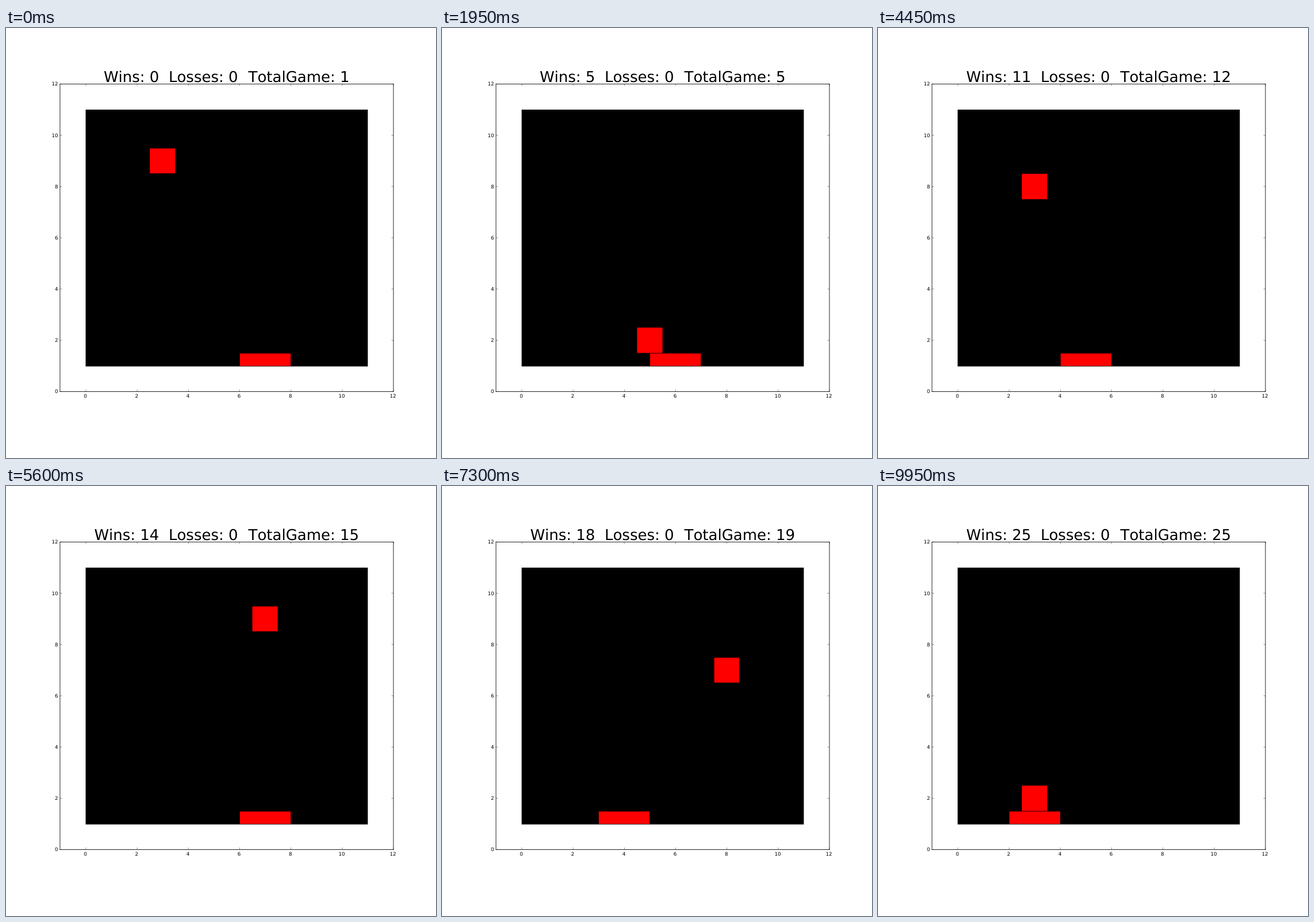
Write an HTML page that moves like this. It is 748 px wide and 748 px high and loops after 10000 ms.

```html
<!DOCTYPE html>
<html lang="en">
<head>
<meta charset="utf-8">
<title>Catch game</title>
<style>
  html, body { margin: 0; width: 100%; height: 100%; overflow: hidden; background: #fff; }
  svg { display: block; width: 748px; height: 748px; }
  text { font-family: "DejaVu Sans", sans-serif; font-size: 10px; font-kerning: none;
         text-rendering: geometricPrecision; white-space: pre; }
  .title { font-size: 30px; }
</style>
</head>
<body>
<svg id="stage" viewBox="0 0 864 864"></svg>
<script>
// The plot is laid out on an 864-unit grid and scaled down to the stage.
const STEP = 50, DROPS = 8, UNIT = 669.6 / 13, DIGIT = 19.1;

// One round per row: ball column, paddle start, paddle end
const rounds = [
  [3, 7, 3], [10, 6, 9], [6, 5, 6], [8, 5, 8], [5, 8, 6],
  [7, 4, 7], [2, 5, 2], [10, 6, 9], [5, 6, 5], [6, 5, 6],
  [4, 6, 4], [3, 6, 3], [7, 5, 7], [5, 7, 5], [7, 7, 7],
  [2, 6, 3], [6, 4, 6], [4, 6, 4], [8, 2, 8], [6, 5, 6],
  [5, 7, 5], [9, 4, 9], [6, 6, 6], [5, 7, 5], [3, 2, 3]
];

const svg = document.getElementById('stage');
const px = u => Math.round(108 + UNIT * (u + 1));
const py = v => Math.round(730.25 - UNIT * v);

function add(tag, attrs, text = '') {
  const el = document.createElementNS('http://www.w3.org/2000/svg', tag);
  set(el, attrs);
  el.textContent = text;
  return svg.appendChild(el);
}

function set(el, attrs) {
  for (const key in attrs) el.setAttribute(key, attrs[key]);
}

const bar = (x, y, width, height, opacity = 1) =>
  add('rect', { x, y, width, height, 'fill-opacity': opacity });

// Fill of a data-space box, inside its one-unit black outline
function box(left, bottom, right, top) {
  const x = px(left) + 1, y = py(top) + 1;
  return { x, y, width: px(right) - x, height: py(bottom) - y };
}

function drawAxes() {
  const l = px(-1), r = px(12), t = py(12), b = py(0);
  bar(px(0), py(11), px(11) - px(0) + 1, py(1) - py(11) + 1);
  for (let n = 0; n <= 12; n += 2) {
    const x = px(n), y = py(n);
    bar(x, t + 0.5, 1, 4, 0.5);
    bar(x, b - 3.5, 1, 4, 0.5);
    bar(l + 0.5, y, 4, 1, 0.5);
    bar(r - 3.5, y, 4, 1, 0.5);
    add('text', { x: x - 0.5, y: 743, 'text-anchor': 'middle' }, n);
    add('text', { x: l - 3.5, y: y + 4, 'text-anchor': 'end' }, n);
  }
  bar(l, t, r - l + 1, 1);
  bar(l, b, r - l + 1, 1);
  bar(l, t, 1, b - t + 1);
  bar(r, t, 1, b - t + 1);
}

drawAxes();
const ball = add('rect', { fill: '#f00' });
const paddle = add('rect', { fill: '#f00' });
const [winsText, lossText, gameText] = [0, 0, 0].map(() => add('text', { class: 'title', y: 108 }));

function label(el, x, text) {
  set(el, { x });
  el.textContent = text;
}

// The title stays centred as its counters grow to two digits.
function drawTitle(wins, game) {
  const a = wins > 9 ? DIGIT / 2 : 0, b = game > 9 ? DIGIT / 2 : 0;
  label(winsText, 196.3 - a - b, `Wins: ${wins}`);
  label(lossText, 326.9 + a - b, 'Losses: 0');
  label(gameText, 487 + a - b, `TotalGame: ${game}`);
}

let shown = -1;
function draw(now) {
  const tick = Math.floor(now / STEP) % (rounds.length * DROPS);
  if (tick === shown) return;
  shown = tick;
  const round = Math.floor(tick / DROPS), drop = tick % DROPS;
  const [col, from, to] = rounds[round];
  const pos = from + Math.sign(to - from) * Math.min(drop, Math.abs(to - from));
  const row = 9 - drop;
  set(ball, box(col - 0.5, row - 0.5, col + 0.5, row + 0.5));
  set(paddle, box(pos - 1, 1, pos + 1, 1.5));
  drawTitle(round + (drop === DROPS - 1 ? 1 : 0), round + 1);
}

const start = performance.now();
function loop() {
  draw(performance.now() - start);
  requestAnimationFrame(loop);
}
loop();
</script>
</body>
</html>
```
